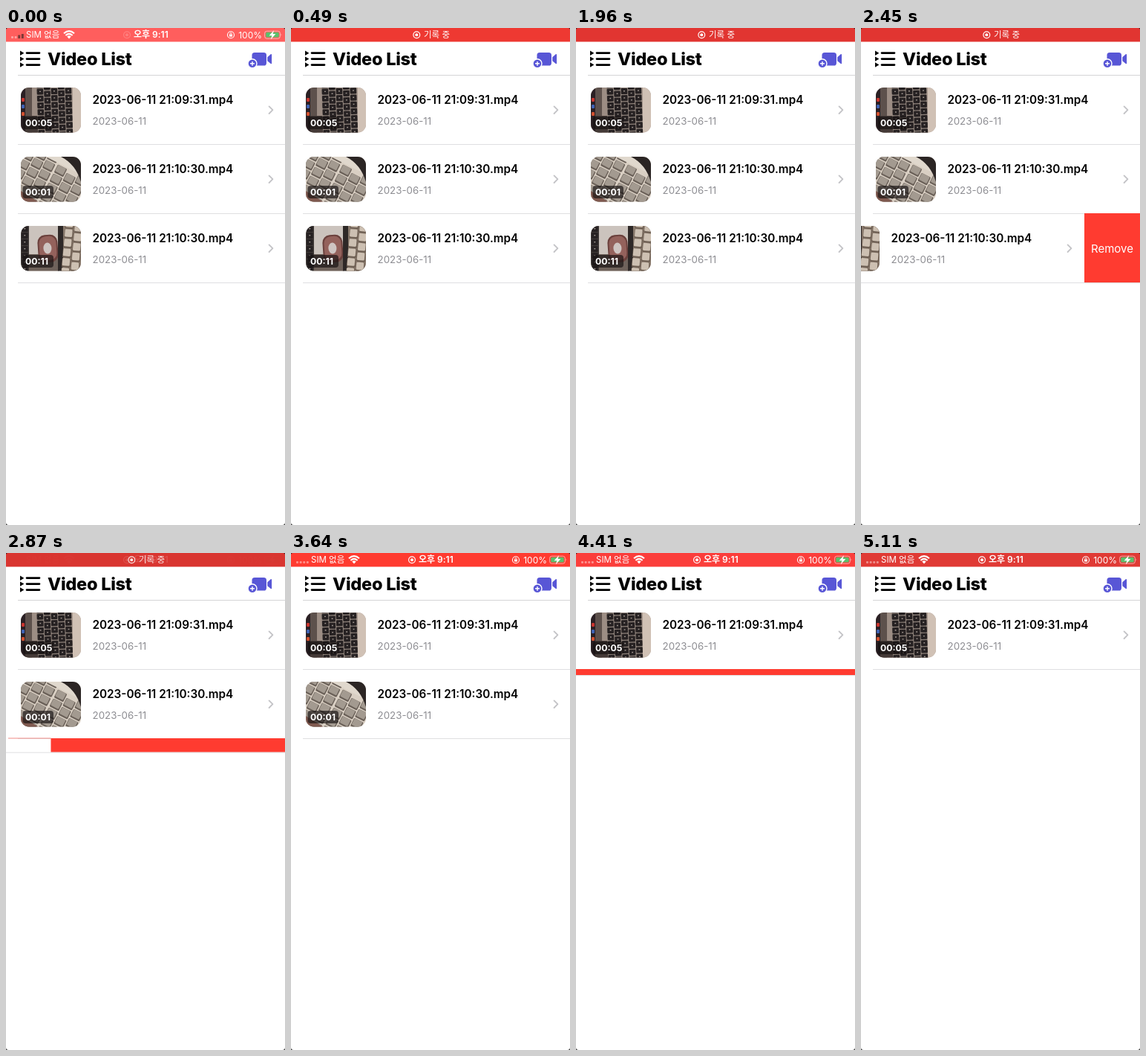
These frames come from a looping animation (376x668 px, 5.18 s). An HTML page:

```html
<!DOCTYPE html>
<html lang="ko">
<head>
<meta charset="utf-8">
<title>Video List</title>
<style>
  html, body { margin: 0; width: 100%; height: 100%; overflow: hidden; background: #fff; }
  svg { display: block; width: 376px; height: 668px; }
  text { font-family: Inter, "Noto Sans CJK KR", "Noto Sans CJK", sans-serif; }
  .title { font-size: 23.6px; font-weight: 800; letter-spacing: -.28px; }
  .name { font-size: 15.3px; font-weight: 600; }
  .date { font-size: 13.3px; fill: #8e8e93; }
  .time { font-size: 12.2px; font-weight: 700; fill: #fff; }
  .remove { font-size: 15px; fill: #fff; text-anchor: middle; }
  .status text { font-size: 12px; fill: #fff; }
  .status .ko { font-size: 11.5px; }
  .status .clock { font-weight: 600; }
</style>
</head>
<body>
<svg viewBox="0 0 376 668">
  <defs>
    <clipPath id="thumbClip"><rect x="20" y="16" width="81" height="60.5" rx="11"/></clipPath>
    <g id="rec">
      <circle r="4.4" fill="none" stroke="#fff" stroke-width="1.2"/>
      <circle r="2" fill="#fff"/>
    </g>
  </defs>
  <rect width="376" height="668" fill="#fff"/>
  <g id="list"></g>

  <path d="M16 63.5H376" stroke="#d4d4d6"/>
  <path d="M19 30.5l5.4 3.2-5.4 3.2zM19 38.4l5.4 3.2-5.4 3.2zM19 46.3l5.4 3.2-5.4 3.2z"/>
  <path d="M28 33.6H45M28 41.6H45M28 49.6H45" stroke="#000" stroke-width="2.7" stroke-linecap="round"/>
  <text class="title" x="56" y="50">Video List</text>
  <g fill="#5856d6">
    <rect x="331.5" y="33" width="19.5" height="17.5" rx="3.6"/>
    <path d="M352.3 39.2l4.2-3.6q1.6-1.2 1.6.6v11q0 1.8-1.6.6l-4.2-3.6z"/>
    <circle cx="332" cy="47.8" r="6" stroke="#fff" stroke-width="1.4"/>
    <path d="M332 44.9v5.8M329.1 47.8h5.8" stroke="#fff" stroke-width="1.4"/>
  </g>

  <rect id="bar" width="376" height="18.5"/>
  <g class="status">
    <g id="sides">
      <g fill="#fff" opacity=".42">
        <rect x="7" y="11" width="3" height="3" rx="1"/><rect x="11.6" y="11" width="3" height="3" rx="1"/>
        <rect x="16.2" y="11" width="3" height="3" rx="1"/><rect x="20.8" y="11" width="3" height="3" rx="1"/>
      </g>
      <path id="signal" d="M16.2 9.5h3V14h-3zM20.8 8h3v6h-3z" fill="#7c3835"/>
      <text class="ko" x="27" y="13.4">SIM 없음</text>
      <g fill="none" stroke="#fff" stroke-width="2.1">
        <path d="M78 7.3Q85 1 92 7.3"/><path d="M80.4 10Q85 5.9 89.6 10"/>
      </g>
      <path d="M82.3 11.5Q85 9.2 87.7 11.5L85 14.4z" fill="#fff"/>
      <circle cx="303" cy="9.3" r="4.5" fill="none" stroke="#fff" stroke-width="1.1"/>
      <rect x="301" y="8.6" width="4" height="3" fill="#fff"/>
      <path d="M301.8 8.8V7.8a1.2 1.2 0 0 1 2.4 0v1" fill="none" stroke="#fff" stroke-width=".8"/>
      <text x="313.2" y="13.5">100%</text>
      <rect x="348.6" y="4.2" width="20.8" height="10" rx="3" fill="none" stroke="#fff" stroke-opacity=".55"/>
      <rect x="350.2" y="5.8" width="17.6" height="6.8" rx="1.6" fill="#5cbf6c"/>
      <path d="M370.6 7.6q1.6 1.6 0 3.2z" fill="#fff" opacity=".6"/>
      <path d="M361.2 3l-6.6 7.2h3.8l-1.6 5.2 6.6-7.4h-3.8z" fill="#fff"/>
    </g>
    <g id="clock">
      <use id="clockRec" href="#rec" x="163" y="9.3"/>
      <text class="clock" x="172" y="13.4">오후 9:11</text>
    </g>
    <g id="recording">
      <use href="#rec" x="169.3" y="9.3"/>
      <text class="ko" x="179" y="13.4">기록 중</text>
    </g>
  </g>
  <path d="M0 664.5V668H3.5Q0 668 0 664.5zM376 664.5V668H372.5Q376 668 376 664.5z" fill="#222"/>
  <path d="M0 2.5V0H2.5Q0 0 0 2.5zM376 2.5V0H373.5Q376 0 376 2.5z" fill="#222"/>
</svg>
<script>
const LOOP = 5180, STEP = 70, W = 376, ROW = 93, BUTTON = 75;
const $ = id => document.getElementById(id);
const rect = (x, y, w, h, fill, rx = 0) =>
  `<rect x="${x}" y="${y}" width="${w}" height="${h}" rx="${rx}" fill="${fill}"/>`;

function keys(cols, rows, x0, y0, dx, dy, draw) {
  let out = '';
  for (let c = 0; c < cols; c++)
    for (let r = 0; r < rows; r++) out += draw(x0 + c * dx, y0 + r * dy + (c % 2) * dy * .35);
  return out;
}

const darkKey = (x, y) => rect(x, y, 8.6, 8, '#262122', 1.2) + rect(x + 3.4, y + 3, 1.8, 1.4, '#a39a94');
const paleKey = (w, h, top, shade) => (x, y) =>
  rect(x, y, w, h, shade, 1.5) + rect(x + .6, y, w - 2, h - 2.2, top, 1.5);

// Thumbnails, drawn in an 81 x 60.5 box
const thumbs = [
  () => rect(0, 0, 81, 61, '#a8998f') + rect(0, 0, 6, 61, '#2a2024') +
    rect(1, 14, 4, 5, '#c8352f', 1) + rect(1, 23, 4, 5, '#3f63b5', 1) + rect(1, 33, 4, 5, '#d2502f', 1) +
    rect(6, 0, 9, 61, '#5d514c') + rect(15, 0, 7, 61, '#9c8d84') + rect(6, 38, 18, 23, '#443a37') +
    rect(70, 0, 11, 61, '#d0c1b5') +
    `<g transform="rotate(-2 40 30)">${rect(22, -4, 47, 70, '#8f837b')}` +
    keys(5, 8, 22.5, -8, 9.5, 9.2, darkKey) + '</g>',
  () => rect(0, 0, 81, 61, '#d9cfc3') +
    `<g transform="rotate(27 40 30)">${keys(3, 6, -8, -4, 15.5, 13.5, paleKey(14, 12, '#a39a90', '#6a6058'))}` +
    keys(3, 5, 40, 8, 15.5, 13.5, paleKey(14, 12, '#a39a90', '#6a6058')) +
    rect(-10, -4, 100, 10, '#e0d8cd') + rect(30, -30, 60, 9, '#8b7d71') + '</g>' +
    '<path d="M54 0H81V34Q74 10 54 0z" fill="#2b2524"/><path d="M0 46L24 61H0z" fill="#805a50"/>',
  () => rect(0, 0, 81, 61, '#cbc3bd') + rect(0, 0, 11, 61, '#3f3937') +
    keys(1, 7, 1, 0, 10, 9, darkKey) + rect(11, 38, 40, 23, '#6f625b') +
    `<g transform="rotate(-4 36 31)">${rect(23, 12, 27, 37, '#6b413d', 10) + rect(25, 14, 23, 32, '#94625c', 9)}` +
    '<ellipse cx="36" cy="30" rx="5.5" ry="7.5" fill="#cfc5c2"/></g>' +
    rect(50, 0, 7, 61, '#2e2827') + rect(57, 0, 24, 61, '#8a7a6d') +
    `<g transform="rotate(5 69 30)">${keys(2, 6, 57, -8, 12.5, 13, paleKey(12, 12.4, '#cdc0b2', '#6f6054'))}</g>`
];

const videos = [
  ['2023-06-11 21:09:31.mp4', '00:05'],
  ['2023-06-11 21:10:30.mp4', '00:01'],
  ['2023-06-11 21:10:30.mp4', '00:11']
];

$('list').innerHTML = videos.map(([name, time], i) => `
  <g id="row${i}" transform="translate(0 ${64 + ROW * i})">
    <clipPath id="clip${i}"><rect class="clip" y="-1" width="${W}" height="${ROW}"/></clipPath>
    <g clip-path="url(#clip${i})">
      <g class="cell">
        <g clip-path="url(#thumbClip)"><g transform="translate(20 16)">${thumbs[i]()}</g>
          ${rect(22.5, 55, 41.5, 17, 'rgba(20,16,16,.66)', 4)}</g>
        <text class="time" x="26" y="67.6">${time}</text>
        <text class="name" x="116.4" y="38">${name}</text>
        <text class="date" x="116.6" y="66.4">2023-06-11</text>
        <path d="M354.6 41.4l4.8 4.8-4.8 4.8" fill="none" stroke="#c4c4c7" stroke-width="1.9"
          stroke-linecap="round" stroke-linejoin="round"/>
      </g>
      <rect class="red" y="-1" height="93" fill="#ff3b30"/>
      <text class="remove" y="51.5">Remove</text>
    </g>
    <path class="edge" stroke="#f08a84"/>
    <path class="line" stroke="#dfdfe1"/>
  </g>`).join('');

const rows = videos.map((_, i) => {
  const root = $('row' + i), part = {};
  for (const k of ['clip', 'cell', 'red', 'remove', 'edge', 'line']) part[k] = root.querySelector('.' + k);
  return { root, ...part };
});

const ramp = (t, a, b) => Math.min(1, Math.max(0, (t - a) / (b - a)));
const ease = (t, a, b) => { const p = ramp(t, a, b); return p * p * (3 - 2 * p); };
const mix = (a, b, p) => a + (b - a) * p;

// Status bar pulse: time, r, g, b
const pulse = [
  [0, 255, 94, 93], [490, 238, 57, 50], [1400, 238, 57, 50], [1680, 225, 53, 49], [2450, 225, 53, 49],
  [2870, 217, 53, 48], [3430, 255, 59, 48], [3640, 255, 59, 48], [4060, 255, 64, 64],
  [4480, 250, 62, 58], [5040, 224, 58, 53], [LOOP, 224, 58, 53]
];

function barColour(t) {
  const i = pulse.findIndex(k => k[0] > t), a = pulse[i - 1], b = pulse[i];
  const p = ramp(t, a[0], b[0]);
  return `rgb(${[1, 2, 3].map(c => Math.round(mix(a[c], b[c], p)))})`;
}

// dx: cell offset, gone: collapsed share, label: centre of the button text
function setRow(row, dx, gone, label) {
  const h = ROW * (1 - gone), left = W + dx;
  row.root.style.display = h < .5 ? 'none' : '';
  row.clip.setAttribute('height', h);
  row.cell.setAttribute('transform', `translate(${dx - (dx < 0 ? 1 : 0)} 0)`);
  row.red.setAttribute('x', left);
  row.red.setAttribute('width', -dx);
  row.remove.setAttribute('x', label);
  row.remove.style.display = dx < 0 ? '' : 'none';
  row.edge.setAttribute('d', gone > 0 ? `M3 -1H${Math.max(3, left)}` : '');
  row.line.setAttribute('d', `M${Math.max(0, 16 + dx)} ${h - .5}H${W}`);
}

function draw(t) {
  $('bar').setAttribute('fill', barColour(t));
  const rec = ramp(t, 0, 280) * (1 - ramp(t, 2840, 3080)), idle = 1 - rec;
  const opening = t < 280;
  $('recording').setAttribute('opacity', rec);
  $('clock').setAttribute('opacity', idle);
  $('sides').setAttribute('opacity', idle * idle);
  $('clockRec').setAttribute('opacity', opening ? .2 : 1);
  $('signal').setAttribute('opacity', opening ? 1 : 0);

  setRow(rows[0], 0, 0, 0);

  // Flicked all the way; the label glides to the leading edge
  const dx2 = -W * ease(t, 3690, 4202), lead2 = W + dx2 + BUTTON / 2;
  const rest = Math.max(lead2, W - BUTTON / 2);
  setRow(rows[1], dx2, ease(t, 4185, 4460), mix(rest, lead2, ease(t, 3995, 4135)));

  // Opened, then confirmed by a tap
  const gone = ease(t, 2677, 2948);
  const dx3 = -BUTTON * ease(t, 1980, 2330) - (W - BUTTON) * gone;
  setRow(rows[2], dx3, gone, W + dx3 + BUTTON / 2);
}

const start = performance.now();
function tick() {
  const t = (performance.now() - start) % LOOP;
  draw(Math.floor(t / STEP) * STEP);
  requestAnimationFrame(tick);
}
tick();
</script>
</body>
</html>
```
